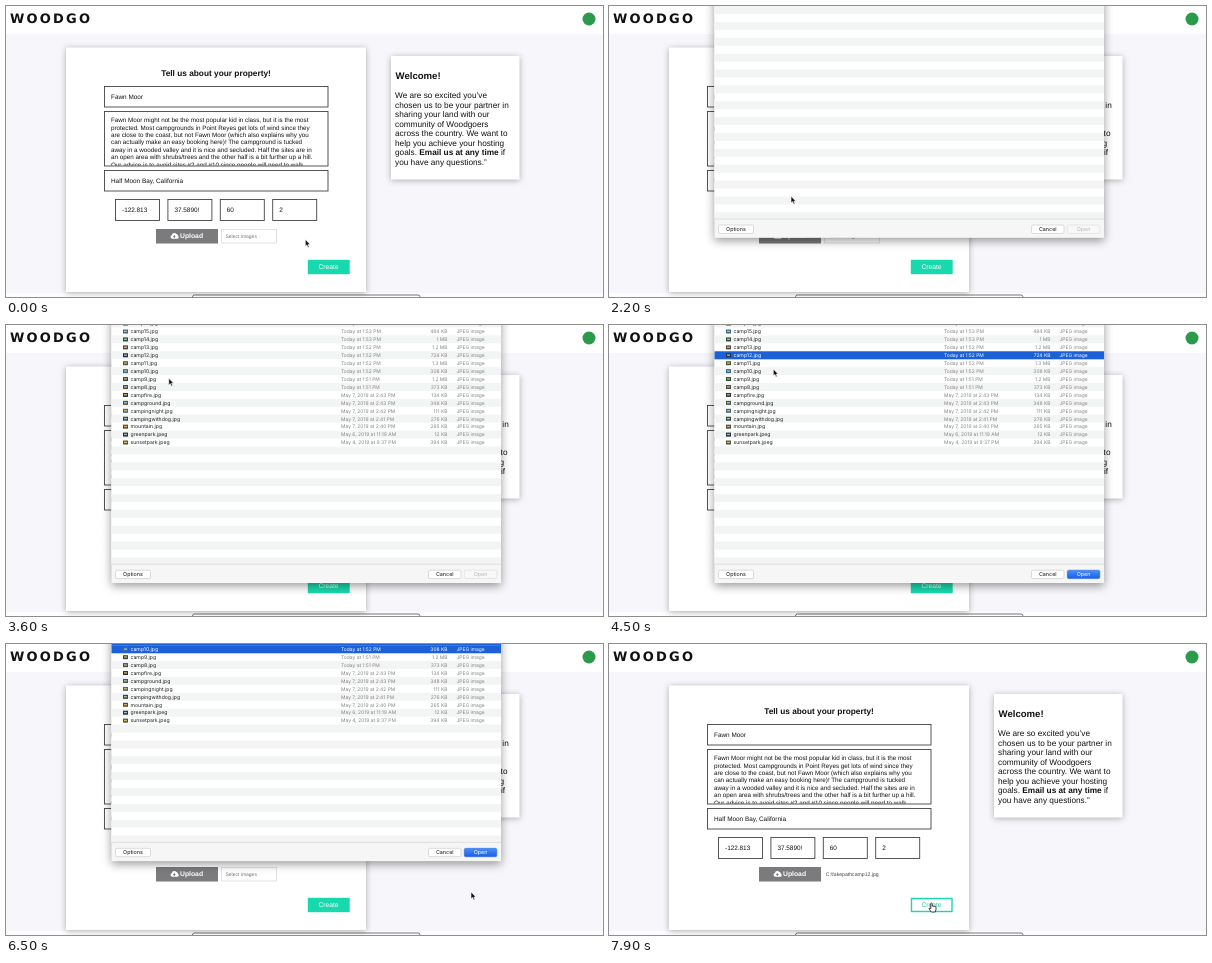
Write an HTML page that moves like this. It is 597 by 291 pixels and loops after 8000 ms.

```html
<!DOCTYPE html>
<html lang="en">
<head>
<meta charset="utf-8">
<title>Property form</title>
<style>
  html, body { margin: 0; width: 100%; height: 100%; overflow: hidden; background: #f7f6fa; }
  svg { display: block; width: 597px; height: 291px; }
  text { font-family: "Liberation Sans", Arial, sans-serif; text-rendering: geometricPrecision; fill: #111; }
  .sheet text { font-family: Inter, sans-serif; }
  .brand { font-family: "DejaVu Sans", sans-serif; }
  .bold { font-weight: bold; }
  .shade { filter: drop-shadow(0 1.5px 3px rgba(0, 0, 0, .3)); }
  .sheet { filter: drop-shadow(0 3px 5px rgba(0, 0, 0, .4)); }
  .field { fill: #fff; stroke: #444; stroke-width: .9; }
</style>
</head>
<body>
<svg id="stage" viewBox="0 0 597 291"></svg>
<script>
const LOOP = 8000, STEP = 100;
const stage = document.getElementById('stage');

function add(parent, tag, attrs = {}, content = '') {
  const el = document.createElementNS('http://www.w3.org/2000/svg', tag);
  set(el, attrs);
  if (content) el.innerHTML = content;
  parent.appendChild(el);
  return el;
}
function set(el, attrs) {
  for (const key in attrs) el.setAttribute(key, attrs[key]);
}
const box = (parent, x, y, width, height, attrs) =>
  add(parent, 'rect', { x, y, width, height, ...attrs });
const label = (parent, x, y, size, content, attrs) =>
  add(parent, 'text', { x, y, 'font-size': size, ...attrs }, content);
const show = (el, on) => set(el, { visibility: on ? 'visible' : 'hidden' });

// Page
box(stage, 0, 0, 597, 291, { fill: '#f7f6fa' });
box(stage, 0, 287, 597, 4, { fill: '#fdfdfe' });
box(stage, 186.5, 289, 227.5, 10, { rx: 2, fill: '#fff', stroke: '#666', 'stroke-width': .9 });
box(stage, 0, 0, 597, 28, { fill: '#fff' });
label(stage, 4, 17, 13, 'WOODGO', { class: 'brand bold', 'letter-spacing': 2.2 });
add(stage, 'circle', { cx: 583, cy: 13, r: 6.5, fill: '#2b9a4b' });

// Form card
box(stage, 60, 41.5, 300, 244.5, { fill: '#fff', class: 'shade' });
label(stage, 210, 70, 8.3, 'Tell us about your property!', { class: 'bold', 'text-anchor': 'middle' });

function field(x, y, w, h, value) {
  box(stage, x, y, w, h, { class: 'field' });
  label(stage, x + 6.5, y + h / 2 + 2.4, 6.4, value);
}
field(98.5, 80.5, 223.5, 20.5, 'Fawn Moor');
field(98.5, 105.5, 223.5, 54.5, '');
field(98.5, 164.5, 223.5, 20.5, 'Half Moon Bay, California');
['-122.813', '37.5890!', '60', '2'].forEach((v, i) => field(109.5 + i * 52.4, 193.5, 44, 21, v));

add(stage, 'clipPath', { id: 'area' }, '<rect x="99" y="106" width="223" height="53.6"/>');
const about = add(stage, 'g', { 'clip-path': 'url(#area)' });
[
  'Fawn Moor might not be the most popular kid in class, but it is the most',
  'protected. Most campgrounds in Point Reyes get lots of wind since they',
  'are close to the coast, but not Fawn Moor (which also explains why you',
  'can actually make an easy booking here)! The campground is tucked',
  'away in a wooded valley and it is nice and secluded. Half the sites are in',
  'an open area with shrubs/trees and the other half is a bit further up a hill.',
  'Our advice is to avoid sites #2 and #10 since people will need to walk'
].forEach((line, i) => label(about, 105, 116.2 + i * 7.4, 6.28, line));

// Buttons
const upload = box(stage, 150.5, 223.5, 61, 13.5, { 'stroke-width': 1 });
const cloud = add(stage, 'path', {
  transform: 'translate(164.3 226.8)',
  d: 'M2 6a2 2 0 0 1-.3-3.9a2.4 2.4 0 0 1 4.4-.8a1.5 1.5 0 0 1 1.4 1.5a1.7 1.7 0 0 1-.5 3.2z'
});
const arrowUp = add(stage, 'path', { transform: 'translate(164.3 226.8)', d: 'M4 2.1L5.6 4H4.5V5.3H3.5V4H2.4z' });
const uploadText = label(stage, 174, 232.4, 6.8, 'Upload', { class: 'bold' });

const emptyFile = add(stage, 'g');
box(emptyFile, 215.5, 223.5, 55, 13.5, { fill: '#fff', stroke: '#ddd', 'stroke-width': .8 });
label(emptyFile, 219.5, 231.8, 5, 'Select images', { style: 'fill:#777' });
const chosenFile = label(stage, 216.8, 231.9, 5.15, 'C:\\fakepathcamp12.jpg', { style: 'fill:#444' });

const create = box(stage, 302.5, 254.5, 40.5, 13, { stroke: '#18d9ad', 'stroke-width': 1.4 });
const createText = label(stage, 322.5, 263.4, 6.7, 'Create', { 'text-anchor': 'middle' });

// Welcome card
box(stage, 385, 50, 128.5, 123.5, { fill: '#fff', class: 'shade' });
label(stage, 389.5, 72.5, 9.6, 'Welcome!', { class: 'bold' });
[
  'We are so excited you’ve',
  'chosen us to be your partner in',
  'sharing your land with our',
  'community of Woodgoers',
  'across the country. We want to',
  'help you achieve your hosting',
  'goals. <tspan class="bold">Email us at any time</tspan> if',
  'you have any questions.”'
].forEach((line, i) => label(stage, 389, 92 + i * 9.5, 8.25, line));

// File sheet
const ROW = 7.93, TOP = 2.5, SHEET_BOTTOM = 258;
const today = m => `Today at 1:${m} PM`;
const may = (d, time) => `May ${d}, 2019 at ${time}`;
const files = [
  ['camp16.jpg', today(53), '1.1 MB'],
  ['camp15.jpg', today(53), '484 KB'],
  ['camp14.jpg', today(53), '1 MB'],
  ['camp13.jpg', today(52), '1.2 MB'],
  ['camp12.jpg', today(52), '724 KB'],
  ['camp11.jpg', today(52), '1.3 MB'],
  ['camp10.jpg', today(52), '308 KB'],
  ['camp9.jpg', today(51), '1.2 MB'],
  ['camp8.jpg', today(51), '373 KB'],
  ['campfire.jpg', may(7, '2:43 PM'), '134 KB'],
  ['campground.jpg', may(7, '2:43 PM'), '348 KB'],
  ['campingnight.jpg', may(7, '2:42 PM'), '111 KB'],
  ['campingwithdog.jpg', may(7, '2:41 PM'), '276 KB'],
  ['mountain.jpg', may(7, '2:40 PM'), '265 KB'],
  ['greenpark.jpeg', may(6, '11:19 AM'), '12 KB'],
  ['sunsetpark.jpeg', may(4, '9:37 PM'), '394 KB']
];
const tones = ['#4c5a3c', '#3d6a86', '#2f4a3a', '#55483a', '#27303f'];

add(stage, 'linearGradient', { id: 'blue', x2: 0, y2: 1 },
  '<stop stop-color="#4a90f8"/><stop offset="1" stop-color="#1a5ee6"/>');
const sheet = add(stage, 'g', { class: 'sheet' });
box(sheet, 105.5, -40, 389.5, 40 + SHEET_BOTTOM, { fill: '#f6f6f6' });
box(sheet, 105.5, -40, 389.5, 279, { fill: '#fff' });
for (let i = -3; i < 30; i += 2) {
  const y = TOP + i * ROW;
  box(sheet, 105.5, y, 389.5, Math.min(ROW, 239 - y), { fill: '#f3f4f4' });
}
box(sheet, 105.5, 238.8, 389.5, .7, { fill: '#d5d5d5' });

const list = add(sheet, 'g');
const rows = files.map(([name, date, size], i) => {
  const y = TOP + (i - 1) * ROW, base = y + 5.8;
  const back = box(list, 105.5, y, 389.5, ROW + .1, { fill: '#1c60d8' });
  box(list, 117, y + 2, 5, 4, { fill: tones[i % 5] });
  box(list, 118, y + 3.2, 3, 1.3, { fill: i % 2 ? '#d9b36a' : '#a9bcc0' });
  const texts = [
    label(list, 124.5, base, 5.15, name),
    label(list, 335, base, 4.95, date),
    label(list, 441.5, base, 4.95, size, { 'text-anchor': 'end' }),
    label(list, 450.5, base, 4.95, 'JPEG image')
  ];
  return { back, texts };
});

function sheetButton(x, w, caption) {
  const back = box(sheet, x, 245.2, w, 8.4, { rx: 1.5, fill: '#fff', stroke: '#c4c4c4', 'stroke-width': .6 });
  const text = label(sheet, x + w / 2, 251.3, 5.4, caption, { 'text-anchor': 'middle' });
  return { back, text };
}
sheetButton(109.5, 35, 'Options');
sheetButton(422.5, 32.5, 'Cancel');
const open = sheetButton(458.3, 32.5, 'Open');

// Pointer, tips at 0,0
const arrow = add(stage, 'path', {
  d: 'M0 0V6.8L1.6 5.4L2.7 7.9L3.9 7.4L2.8 5H4.9Z',
  fill: '#111', stroke: '#fff', 'stroke-width': .6
});
const hand = add(stage, 'path', {
  d: 'M-.7 .5Q0-.5 .7 .5V3.2Q1.4 2.5 2.1 3.4Q2.8 2.8 3.4 3.7Q4.4 3.3 4.5 4.4V6.3L3.7 9H-.2L-2.5 5.8Q-2.4 4.6-1.3 5.2L-.7 5.8Z',
  fill: '#fff', stroke: '#111', 'stroke-width': .8, 'stroke-linejoin': 'round'
});

// Time, x, y of the pointer
const path = [
  [0, 299.3, 233.5], [200, 299.3, 233.5], [1000, 182.3, 227.5], [1900, 182.3, 227.5],
  [2700, 181.3, 95], [3200, 181.3, 95], [3900, 152, 29], [4200, 152, 29],
  [4500, 164.3, 44], [4800, 164.3, 44], [5300, 345, 182], [5800, 465, 248],
  [7200, 465, 248], [7800, 322.5, 259], [LOOP, 322.5, 259]
];
const ease = p => p < .5 ? 2 * p * p : 1 - 2 * (1 - p) * (1 - p);
const phase = (t, from, to) => ease(Math.min(1, Math.max(0, (t - from) / (to - from))));

function pointerAt(t) {
  const i = path.findIndex(k => k[0] > t);
  const [t0, x0, y0] = path[i - 1], [t1, x1, y1] = path[i];
  const p = phase(t, t0, t1);
  return [x0 + (x1 - x0) * p, y0 + (y1 - y0) * p];
}

function draw(t) {
  const [x, y] = pointerAt(t);
  const shift = 265 * (phase(t, 1850, 2300) - phase(t, 6375, 6825) - 1);
  const covered = x > 105 && x < 495 && y < SHEET_BOTTOM + shift;
  const over = (l, top, r, b) => !covered && x > l && x < r && y > top && y < b;
  const onUpload = over(150, 223, 212, 237), onCreate = over(302, 254, 344, 268);

  const back = onUpload ? '#fff' : '#7b7b7e', front = onUpload ? '#77777a' : '#fff';
  set(upload, { fill: back, stroke: onUpload ? '#555' : back });
  set(cloud, { fill: front });
  set(arrowUp, { fill: back });
  uploadText.style.fill = front;
  set(create, { fill: onCreate ? '#fff' : '#18d9ad' });
  createText.style.fill = onCreate ? '#18c9a5' : '#fff';
  show(emptyFile, t < 6900);
  show(chosenFile, t >= 6900);

  sheet.style.display = shift <= -265 ? 'none' : '';
  set(sheet, { transform: `translate(0 ${shift})` });
  list.style.display = t >= 3000 ? '' : 'none';
  const last = t < 4100 ? 0 : t < 4700 ? 4 : 6;
  rows.forEach(({ back, texts }, i) => {
    const on = i >= 4 && i <= last;
    back.style.display = on ? '' : 'none';
    texts.forEach((el, k) => el.style.fill = on ? '#fff' : k ? '#858585' : '#222');
  });
  set(open.back, { fill: last ? 'url(#blue)' : '#f8f8f8', stroke: last ? '#2a68dc' : '#dadada' });
  open.text.style.fill = last ? '#fff' : '#b5b5b5';

  const onButton = onUpload || onCreate;
  show(hand, onButton);
  show(arrow, !onButton);
  set(onButton ? hand : arrow, { transform: `translate(${x} ${y})` });
}

const start = performance.now();
function tick() {
  const t = (performance.now() - start) % LOOP;
  draw(Math.floor(t / STEP) * STEP);
  requestAnimationFrame(tick);
}
tick();
</script>
</body>
</html>
```
